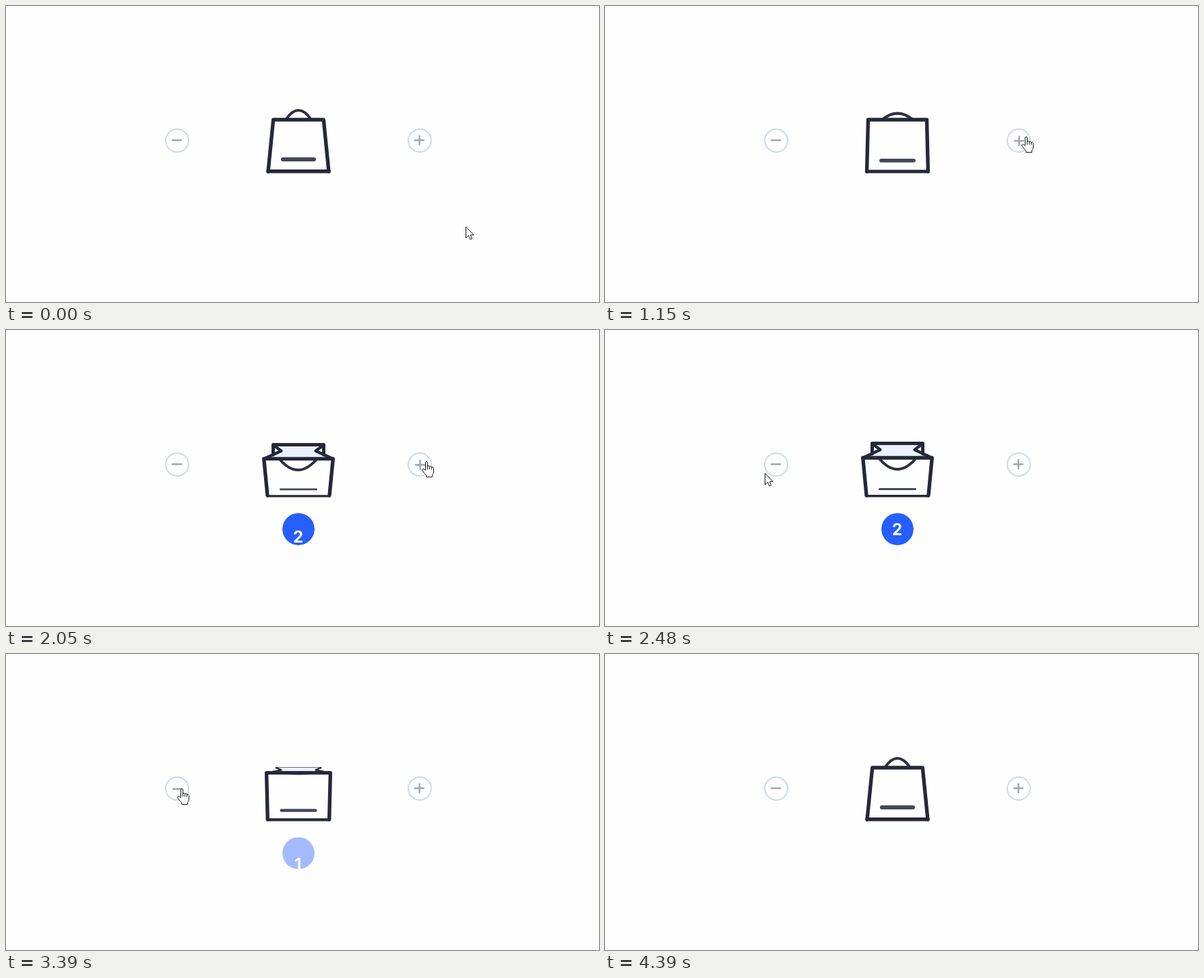
These frames come from a looping animation (880 px wide and 440 px high, 4490 ms). An HTML page:

```html
<!DOCTYPE html>
<html lang="en">
<head>
<meta charset="utf-8">
<title>Bag counter</title>
<style>
  html, body { margin: 0; width: 100%; height: 100%; overflow: hidden; background: #fefefe; }
  svg { display: block; width: 880px; height: 440px; }
  path { fill: none; stroke: #242838; stroke-linecap: round; stroke-linejoin: round; }
  .ring { fill: none; stroke: #cdd9ed; stroke-width: 2; }
  .icon { stroke: #99a3ba; stroke-width: 2.4; }
  #inside { fill: #ecf0fe; stroke: none; }
  #face { fill: #fefefe; stroke: none; }
  #frame { stroke-width: 5.4; }
  #handle { stroke: #2d3040; stroke-width: 4; }
  #label { stroke: #434759; }
  #badge circle { fill: #275efe; }
  #badge text { font: 700 24px Inter, Roboto, sans-serif; fill: #fff; text-anchor: middle; }
  #cursor path { fill: #fff; stroke: #111; stroke-width: 1; }
</style>
</head>
<body>
<svg viewBox="0 0 880 440">
  <defs><clipPath id="disc"><circle cx="434" cy="296" r="24"/></clipPath></defs>

  <circle class="ring" cx="254" cy="200" r="17"/>
  <path class="icon" id="minus" d="M247 199.5h13"/>
  <circle class="ring" cx="614" cy="200" r="17"/>
  <path class="icon" id="plus" d="M607 199.5h13M613.5 193v13"/>

  <g id="bag">
    <g id="back">
      <path id="inside"/>
      <path id="rim"/>
      <path id="folds"/>
    </g>
    <path id="face"/>
    <path id="handle"/>
    <path id="frame"/>
    <path id="base"/>
    <path id="label"/>
  </g>

  <g id="badge" clip-path="url(#disc)">
    <circle cx="434" cy="296" r="24"/>
    <g id="digits">
      <text x="433.5" y="304.7">0</text>
      <text x="433.5" y="352.7">1</text>
      <text x="433.5" y="400.7">2</text>
    </g>
  </g>

  <g id="cursor">
    <path id="arrow" d="M.5 .5V17L4.5 13.3 7 19 9.6 17.9 7.2 12.3H11.8Z"/>
    <path id="hand" d="M-.5 13V2Q-.5 .5 1 .5T2.5 2V8.2Q2.8 6.8 4 6.8T5.6 8.6Q6 7.4 7.2 7.5T8.6 9.4Q9 8.4 10 8.6T11.5 10.5V16Q11.5 18.5 9.5 20.5V23.5H.8V21Q-2.2 18.5-4.8 14.6-6 12.5-4.8 11.8-3.4 11-2 12.4ZM2.5 8.2V12M5.6 8.8V12M8.6 9.6V12"/>
  </g>
</svg>
<script>
const LOOP = 4490, CX = 434;
const OPEN = 1035, ADD = 1850, REMOVE = 2805, CLOSE = 3295;
const TRAIL = [
  [0, 682, 328], [100, 682, 328], [300, 670, 285], [550, 648, 227], [800, 630, 200],
  [950, 624, 194], [1150, 624, 194], [1500, 623, 195], [2060, 623, 195], [2150, 400, 208],
  [2230, 216, 220], [2320, 213, 222], [2500, 240, 212], [2700, 260, 200], [3450, 260, 200],
  [3580, 390, 262], [3740, 640, 370], [3900, 765, 424], [4050, 787, 445], [LOOP, 787, 445]
];

const $ = id => document.getElementById(id);
const draw = (id, d, width) => {
  $(id).setAttribute('d', d);
  if (width !== undefined) $(id).style.strokeWidth = width;
};
const move = (id, x, y) => $(id).setAttribute('transform', `translate(${x} ${y})`);
const span = (t, start, length) => Math.min(1, Math.max(0, (t - start) / length));
const swing = u => (1 - Math.cos(Math.PI * u)) / 2;
const glide = u => 1 - (1 - u ** 1.5) ** 3.2;

// 0 is shut, 1 is open; closing overshoots below 0
function openness(t) {
  if (t < CLOSE) return swing(span(t, OPEN, 250));
  return 1 - 1.2 * swing(span(t, CLOSE, 300)) + .2 * swing(span(t, CLOSE + 300, 200));
}

function squash(t) {
  const bump = start => {
    const u = (t - start) / 400;
    return u > 0 ? 2.14 * u * Math.exp(-u / .133) : 0;
  };
  return bump(ADD) + (t < CLOSE ? bump(REMOVE) : 0);
}

function drawBag(t) {
  const p = openness(t), dip = squash(t), sq = p * p;
  const half = 37.3 + 14 * p;
  const top = 169 + Math.max(0, p) * 37.5 * (p - .44);
  const foot = 45 + p, bottom = 246;
  const gap = Math.max(0, (top - 169) / 21), line = gap * gap;

  $('bag').setAttribute('transform', `translate(0 ${248.5 * dip}) scale(1 ${1 - dip})`);

  $('back').style.display = gap > 0 ? '' : 'none';
  const rim = 32.5 + 5 * line, fold = 169 + (top - 169) * .43, inner = 25.5;
  draw('inside', `M${CX - rim} 168.5H${CX + rim}L${CX + inner} ${fold}L${CX + half} ${top}` +
    `H${CX - half}L${CX - inner} ${fold}Z`);
  draw('rim', `M${CX - rim} ${top - 6}V168.5H${CX + rim}V${top - 6}`, 5 * line);
  const side = s => `M${CX + s * rim} 169L${CX + s * inner} ${fold}L${CX + s * half} ${top}`;
  draw('folds', side(-1) + side(1), 2 + 2.4 * line);

  const front = `M${CX - foot} ${bottom}L${CX - half} ${top}H${CX + half}L${CX + foot} ${bottom}`;
  draw('face', front + 'Z');
  draw('frame', front);
  draw('base', `M${CX - foot} ${245.8 + sq}H${CX + foot}`, 5.4 - 2 * sq);

  const reach = 19 + 9 * p, lean = -35 * dip;
  const sag = p < 0 ? -14 + 35 * p : -14 - 6 * p + 37 * sq;
  draw('handle', `M${CX - reach + lean / 2} ${top}Q${CX + lean} ${top + 2 * sag} ${CX + reach + lean / 2} ${top}`);

  const thick = 6 - 3 * sq, w = 26 + 2 * p - thick / 2;
  draw('label', `M${CX - w} ${228 + 8.6 * sq}H${CX + w}`, thick);
}

function drawBadge(t) {
  const slide = start => glide(span(t, start, 400));
  const count = slide(OPEN + 255) + slide(ADD) - slide(REMOVE) - slide(CLOSE);
  move('digits', 0, -48 * count);
  $('badge').style.opacity = span(t, OPEN + 255, 165) - span(t, CLOSE, 165);
}

function drawCursor(t) {
  const i = TRAIL.findIndex(k => k[0] > t);
  const [t0, x0, y0] = TRAIL[i - 1], [t1, x1, y1] = TRAIL[i];
  const u = (t - t0) / (t1 - t0);
  const x = Math.round(x0 + (x1 - x0) * u), y = Math.round(y0 + (y1 - y0) * u);
  const over = [254, 614].some(cx => Math.hypot(x - cx, y - 200) <= 18);
  $('hand').style.display = over ? '' : 'none';
  $('arrow').style.display = over ? 'none' : '';
  move('cursor', x, y);
}

function drawButtons(t) {
  const pressed = starts => starts.some(s => t >= s && t < s + 260) ? 1 : 0;
  const a = pressed([OPEN, ADD]), b = pressed([REMOVE, CLOSE]);
  move('plus', a, a);
  move('minus', b, b);
}

const began = performance.now();
function tick() {
  const t = (performance.now() - began) % LOOP;
  drawBag(t);
  drawBadge(t);
  drawCursor(t);
  drawButtons(t);
  requestAnimationFrame(tick);
}
tick();
</script>
</body>
</html>
```
